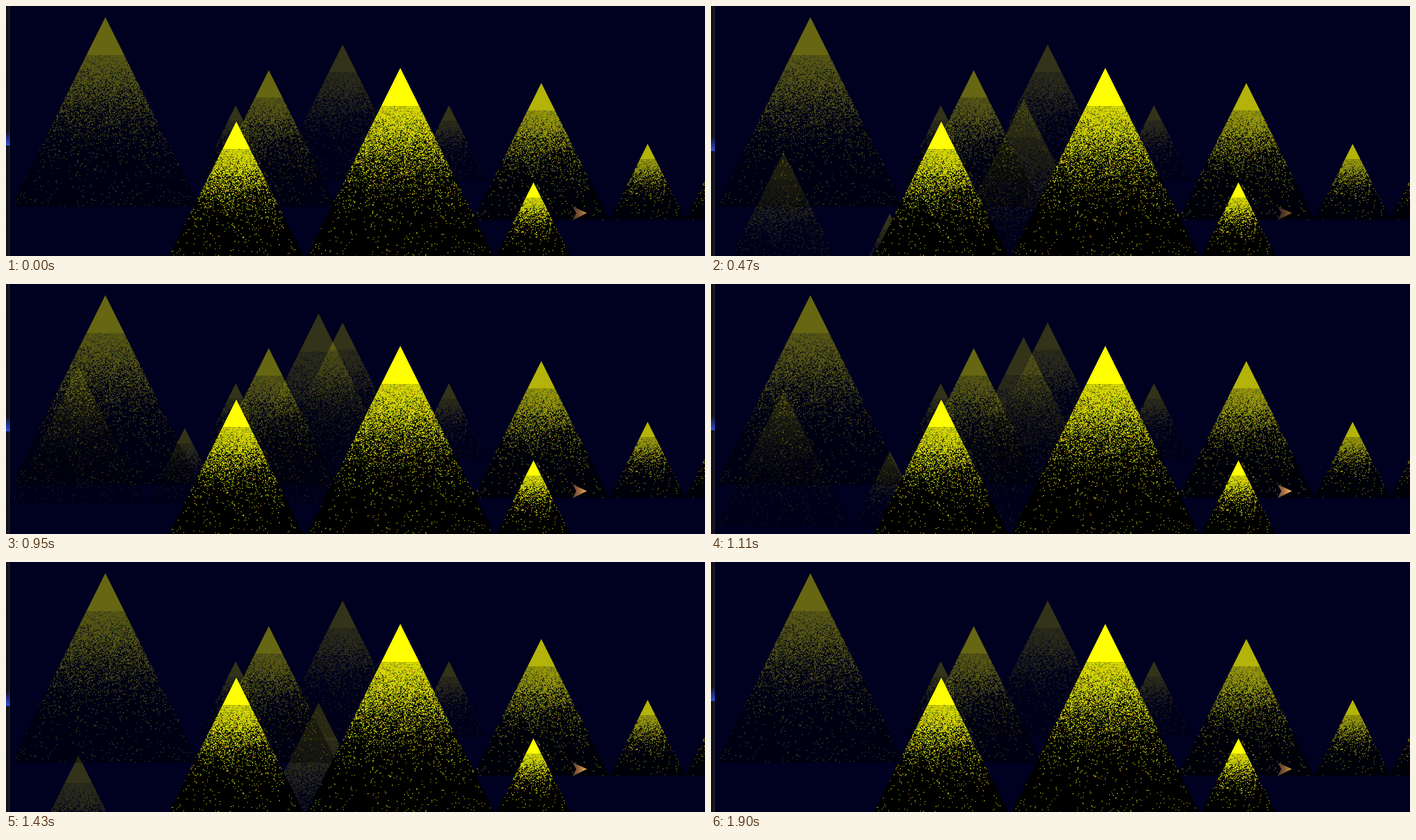
An HTML page with a canvas for the animation above (1.98 s loop, 1249x448 px).

```html
<!DOCTYPE html>
<html lang="en">
<head>
<meta charset="utf-8">
<title>Forest</title>
<style>
  html, body { margin: 0; width: 100%; height: 100%; overflow: hidden; background: #000020; }
  canvas { display: block; }
</style>
</head>
<body>
<canvas id="stage" width="1249" height="448"></canvas>
<script>
const LOOP = 1980, W = 1249, H = 448;
const LARGE = 340, MEDIUM = 245, SMALL = 136;
const SLOPE = 0.497; // half width per unit of height
const GRAIN = 1.5;

// Rows from back to front: opacity and [apex x, apex y, height]
const ROWS = [
  { alpha: 0.2, trees: [[601, 69, MEDIUM], [410, 178, SMALL], [791, 178, SMALL]] },
  { alpha: 0.4, trees: [[177, 20, LARGE], [469, 115, MEDIUM]] },
  { alpha: 0.7, trees: [[956, 138, MEDIUM], [1146, 247, SMALL], [1281, 247, SMALL]] },
  { alpha: 1, trees: [[411, 207, MEDIUM], [704, 111, LARGE], [942, 316, SMALL]] }
];
const SCROLLING = [[558, 0, LARGE], [129, 95, MEDIUM], [319, 205, SMALL]];

// [time, value] keys
const SCROLL = [[0, 504], [320, 221], [550, 67], [710, 42], [870, 43], [1030, 62],
  [1110, 95], [1270, 180], [1590, 323], [1900, 530], [1980, 504]];
const GLOW = [[0, 0.75], [160, 0.65], [320, 0.4], [480, 0.6], [710, 0.8], [1110, 1],
  [1270, 0.95], [1590, 0.85], [1900, 0.75], [1980, 0.75]];

let seed = 20;
function random() {
  seed = (seed + 0x6d2b79f5) | 0;
  let n = Math.imul(seed ^ (seed >>> 15), 1 | seed);
  n = (n + Math.imul(n ^ (n >>> 7), 61 | n)) ^ n;
  return ((n ^ (n >>> 14)) >>> 0) / 4294967296;
}

function makeCanvas(width, height) {
  const canvas = document.createElement('canvas');
  canvas.width = width;
  canvas.height = height;
  return canvas;
}

function polygon(ctx, points) {
  ctx.beginPath();
  points.forEach(([x, y]) => ctx.lineTo(x, y));
  ctx.closePath();
}

function speckColor(depth) {
  const r = random();
  if (r > depth) return '#ff0';
  if (r < depth * 0.4) return '#b4c814';
  return r < depth * 0.75 ? '#6eaa1e' : '#c88228';
}

// A black triangle with a solid yellow tip that dissolves into specks
function makeTree(height) {
  const half = Math.round(height * SLOPE), center = half + 0.5;
  const tip = Math.round(height * 0.2);
  const canvas = makeCanvas(half * 2 + 1, height);
  const ctx = canvas.getContext('2d');
  polygon(ctx, [[center, 0], [center + half, height], [center - half, height]]);
  ctx.fill();
  ctx.clip();
  ctx.fillStyle = '#ff0';
  ctx.fillRect(0, 0, canvas.width, tip);
  for (let y = tip; y < height; y += GRAIN) {
    const depth = y / height;
    const density = 0.02 + 0.98 * Math.exp(-(((depth - 0.2) / 0.27) ** 2));
    const reach = y * SLOPE + 2;
    for (let x = center - reach; x < center + reach; x += GRAIN) {
      if (random() > density) continue;
      ctx.fillStyle = speckColor(depth);
      ctx.fillRect(x, y, GRAIN, GRAIN);
    }
  }
  return canvas;
}

const sprites = {};
for (const size of [LARGE, MEDIUM, SMALL]) sprites[size] = makeTree(size);

function drawTrees(ctx, trees, alpha, offset = 0) {
  ctx.globalAlpha = alpha;
  for (const [x, y, size] of trees) {
    const sprite = sprites[size];
    ctx.drawImage(sprite, x - (sprite.width - 1) / 2, Math.round(y + offset));
  }
  ctx.globalAlpha = 1;
}

const forest = makeCanvas(W, H);
for (const { alpha, trees } of ROWS) drawTrees(forest.getContext('2d'), trees, alpha);

function valueAt(keys, t) {
  const i = Math.max(1, keys.findIndex(([time]) => time >= t));
  const [t0, v0] = keys[i - 1], [t1, v1] = keys[i];
  return v0 + (v1 - v0) * (t - t0) / (t1 - t0);
}

// The picture advances in 80 ms steps, re-aligned at 550 and 1660 ms
function stepTime(t) {
  const start = t < 550 ? 0 : t < 1660 ? 550 : 1660;
  return start + Math.floor((t - start) / 80) * 80;
}

const ctx = document.getElementById('stage').getContext('2d');

function drawScrollbar(scroll) {
  const bottom = Math.round(264 - (scroll - 42) / 33);
  const track = ctx.createLinearGradient(0, 0, 7, 0);
  track.addColorStop(0, '#0e0d16');
  track.addColorStop(0.6, '#16151e');
  track.addColorStop(1, '#242228');
  ctx.fillStyle = track;
  ctx.fillRect(0, 0, 7, H);
  const thumb = ctx.createLinearGradient(0, bottom - 26, 0, bottom);
  thumb.addColorStop(0, 'rgba(30, 50, 140, 0)');
  thumb.addColorStop(0.5, 'rgba(34, 58, 165, 0.75)');
  thumb.addColorStop(1, '#2d50dc');
  ctx.fillStyle = thumb;
  ctx.fillRect(0, bottom - 26, 7, 26);
}

function drawArrow(glow) {
  const fill = ctx.createLinearGradient(1013, 0, 1038, 0);
  fill.addColorStop(0, '#604638');
  fill.addColorStop(0.5, '#b87a45');
  fill.addColorStop(1, '#ffc850');
  const inset = glow < 0.5 ? 2 : 0;
  ctx.globalAlpha = glow;
  ctx.fillStyle = fill;
  polygon(ctx, [[1012 + inset, 359 + inset], [1038, 371], [1012 + inset, 384 - inset], [1019, 371]]);
  ctx.fill();
  ctx.globalAlpha = 1;
}

function draw(now) {
  const t = stepTime(now % LOOP);
  const scroll = valueAt(SCROLL, t);
  ctx.fillStyle = '#000020';
  ctx.fillRect(0, 0, W, H);
  drawTrees(ctx, SCROLLING, 0.2, scroll);
  ctx.drawImage(forest, 0, 0);
  drawArrow(valueAt(GLOW, t));
  drawScrollbar(scroll);
}

const start = performance.now();
function tick() {
  draw(performance.now() - start);
  requestAnimationFrame(tick);
}
tick();
</script>
</body>
</html>
```
